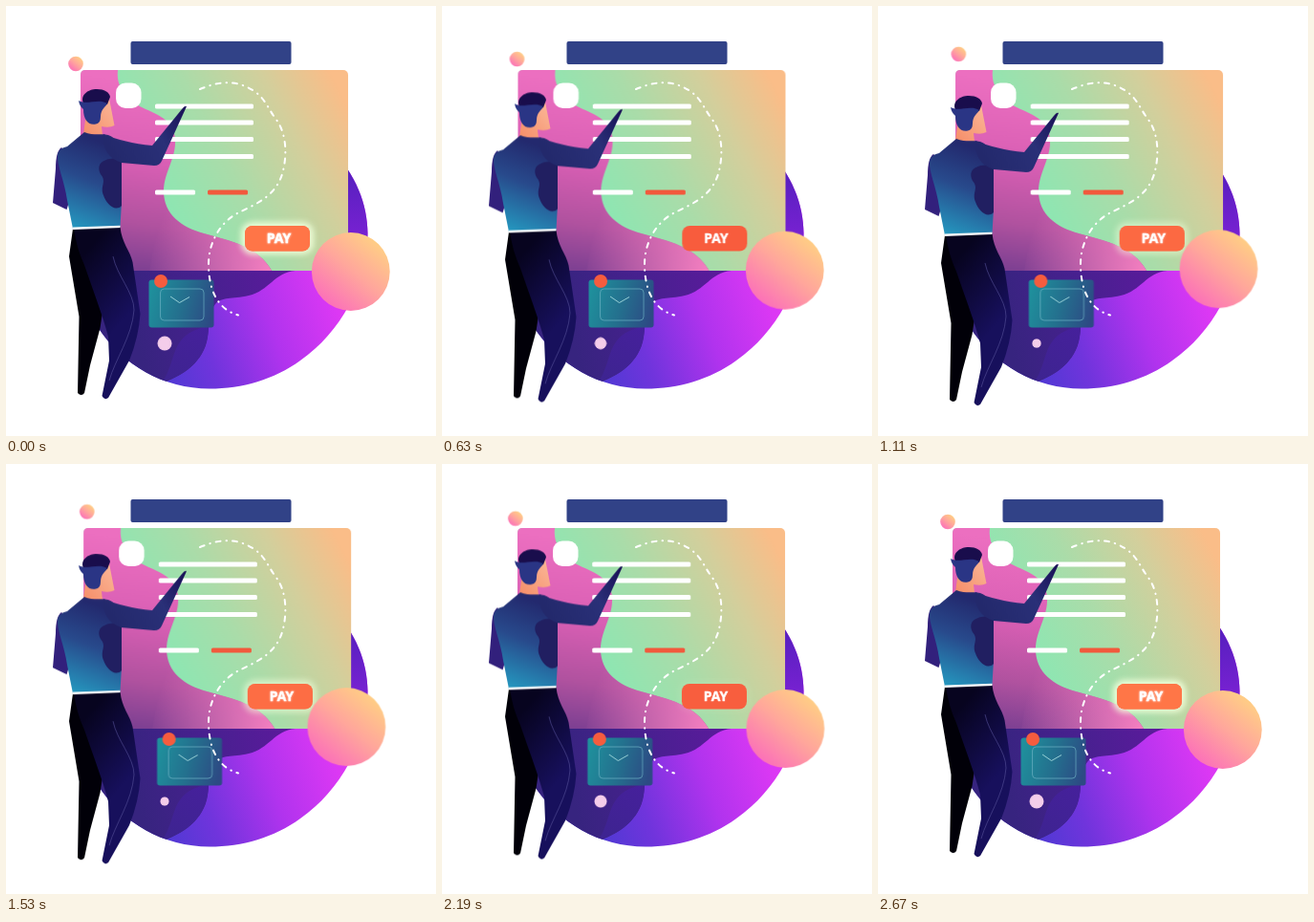
Write an HTML page that moves like this. It is 450 px wide and 450 px high and loops after 2700 ms.

```html
<!DOCTYPE html>
<html lang="en">
<head>
<meta charset="utf-8">
<title>Payment illustration</title>
<style>
  html, body { margin: 0; width: 100%; height: 100%; overflow: hidden; background: #fff; }
  svg { display: block; width: 100vw; height: 100vh; }
  #dot { transform-box: fill-box; transform-origin: center; }
  .pay { font: 700 14px "Open Sans", "Noto Sans", sans-serif; text-anchor: middle; fill: #fff; stroke: #fff; stroke-width: .4; }
  .soft { filter: blur(3px); }
  .halo { filter: blur(1px); }
</style>
</head>
<body>
<svg viewBox="0 0 450 450">
  <defs>
    <linearGradient id="blobFill" gradientUnits="userSpaceOnUse" x1="150" y1="370" x2="340" y2="300">
      <stop offset="0" stop-color="#4a3ad2"/>
      <stop offset=".3" stop-color="#7034dc"/>
      <stop offset=".65" stop-color="#b133ee"/>
      <stop offset="1" stop-color="#dc38f4"/>
    </linearGradient>
    <linearGradient id="blobTop" gradientUnits="userSpaceOnUse" x1="130" y1="320" x2="300" y2="280">
      <stop offset="0" stop-color="#37247f"/>
      <stop offset=".5" stop-color="#482090"/>
      <stop offset="1" stop-color="#5c1a9c"/>
    </linearGradient>
    <linearGradient id="blobSide" x1="0" y1="0" x2="0" y2="1">
      <stop offset="0" stop-color="#4a1fb8"/>
      <stop offset="1" stop-color="#8a22dc"/>
    </linearGradient>
    <linearGradient id="lobe" gradientUnits="userSpaceOnUse" x1="205" y1="330" x2="165" y2="392">
      <stop offset="0" stop-color="#46209c"/>
      <stop offset="1" stop-color="#3d2490"/>
    </linearGradient>
    <linearGradient id="cardFill" gradientUnits="userSpaceOnUse" x1="165" y1="200" x2="355" y2="100">
      <stop offset="0" stop-color="#8ee6b2"/>
      <stop offset=".35" stop-color="#aadca9"/>
      <stop offset=".7" stop-color="#d3cf9c"/>
      <stop offset="1" stop-color="#fabd88"/>
    </linearGradient>
    <linearGradient id="waveFill" gradientUnits="userSpaceOnUse" x1="170" y1="85" x2="140" y2="285">
      <stop offset="0" stop-color="#ec6fc0"/>
      <stop offset=".4" stop-color="#d95fb4"/>
      <stop offset=".72" stop-color="#b0529f"/>
      <stop offset="1" stop-color="#753d90"/>
    </linearGradient>
    <linearGradient id="waveEnd" gradientUnits="userSpaceOnUse" x1="160" y1="230" x2="278" y2="270">
      <stop offset="0" stop-color="#f47fc0" stop-opacity="0"/>
      <stop offset="1" stop-color="#f47fc0"/>
    </linearGradient>
    <linearGradient id="ball" x1=".85" y1=".1" x2=".2" y2=".9">
      <stop offset="0" stop-color="#ffd084"/>
      <stop offset=".5" stop-color="#ffa69c"/>
      <stop offset="1" stop-color="#fc72b8"/>
    </linearGradient>
    <linearGradient id="mailFill" x1="0" y1=".4" x2="1" y2=".6">
      <stop offset="0" stop-color="#1f8f9c"/>
      <stop offset=".5" stop-color="#24708e"/>
      <stop offset="1" stop-color="#2d4a84"/>
    </linearGradient>
    <linearGradient id="shirt" gradientUnits="userSpaceOnUse" x1="108" y1="145" x2="74" y2="232">
      <stop offset="0" stop-color="#23296e"/>
      <stop offset=".45" stop-color="#284a8c"/>
      <stop offset="1" stop-color="#2596be"/>
    </linearGradient>
    <linearGradient id="arm" gradientUnits="userSpaceOnUse" x1="110" y1="155" x2="188" y2="110">
      <stop offset="0" stop-color="#23296c"/>
      <stop offset=".6" stop-color="#2a3078"/>
      <stop offset="1" stop-color="#1a1258"/>
    </linearGradient>
    <linearGradient id="skin" x1="0" y1="1" x2="1" y2="0">
      <stop offset="0" stop-color="#f58d68"/>
      <stop offset="1" stop-color="#fbb99a"/>
    </linearGradient>
    <linearGradient id="leg" gradientUnits="userSpaceOnUse" x1="80" y1="260" x2="138" y2="310">
      <stop offset="0" stop-color="#07041f"/>
      <stop offset="1" stop-color="#17105c"/>
    </linearGradient>
    <clipPath id="blobClip"><use href="#blob"/></clipPath>
  </defs>

  <rect width="450" height="450" fill="#fff"/>

  <path id="blob" fill="url(#blobFill)" d="M340 150C366 175 378.500 208 378.500 238C378.500 290 350 342 308 371C280 391 248 400.500 213 400.500C165 400.500 122 376 96 336L97 200Z"/>
  <g clip-path="url(#blobClip)">
    <rect x="340" y="150" width="60" height="127" fill="url(#blobSide)"/>
    <path fill="url(#blobTop)" d="M90 277H303C280 279 276 298 254 303C236 307 226 304 219 312C212 320 213 333 211 347C207 372 186 387 160 396L90 390Z"/>
    <path fill="url(#lobe)" d="M212 334C212 368 190 386 164 393C178 372 172 352 196 340Z"/>
  </g>

  <g id="card">
    <rect x="78" y="67" width="280" height="210" rx="5" fill="url(#cardFill)"/>
    <path fill="url(#waveFill)" d="M83 67H117C115 83 124 96 140 105C156 113 176 118 177 140C178 160 165 174 165 194C165 218 184 232 207 238C236 246 264 252 278 277H83Q78 277 78 272V72Q78 67 83 67Z"/>
    <path fill="url(#waveEnd)" d="M165 194C165 218 184 232 207 238C236 246 264 252 278 277H150Z"/>
    <rect x="115" y="80.500" width="26.500" height="26.500" rx="10" fill="#fff"/>
  </g>

  <rect x="130.500" y="37" width="168" height="24" rx="2" fill="#314287"/>

  <g id="lines"></g>

  <g id="button">
    <rect class="glow soft" x="246" y="226" width="76" height="34" rx="12" fill="#f0ffda"/>
    <rect x="250" y="230" width="68" height="26.500" rx="8" fill="#f85c3e"/>
    <rect class="glow" x="250" y="230" width="68" height="26.500" rx="8" fill="#ff7848" opacity="0"/>
    <text class="pay glow halo" x="285.500" y="248">PAY</text>
    <text class="pay" x="285.500" y="248">PAY</text>
  </g>

  <g id="mail">
    <rect x="149.500" y="286.500" width="68" height="50" rx="3" fill="url(#mailFill)"/>
    <rect x="161.500" y="296" width="45.500" height="33" rx="4" fill="none" stroke="#6fb4c4" stroke-width=".7"/>
    <path d="M172 304L181.500 310.500L192 304.500" fill="none" stroke="#a6dde0" stroke-width=".9"/>
    <circle cx="162" cy="288" r="7" fill="#f65c3e"/>
  </g>

  <path fill="none" stroke="#fff" stroke-width="2" stroke-linecap="round" stroke-dasharray="5 6 .5 6"
    d="M203 87C220 80 240 75 261 90C272 98 275 109 283 119C293 133 295 155 289 176C281 201 259 208 242 217C222 228 212 250 212 270C212 295 220 317 243 323.500"/>

  <circle id="dot" cx="166" cy="353" r="7.500" fill="#f4cdea"/>
  <circle id="big" cx="360.800" cy="278" r="40.900" fill="url(#ball)"/>
  <circle id="small" cx="73" cy="60.500" r="7.800" fill="url(#ball)"/>

  <g id="man">
    <path fill="#010008" d="M70 233H118L104 300L98.500 337L88 376L82 405Q79 409 75 405L76.500 325L66 262Z"/>
    <path fill="url(#leg)" d="M71 233L119.500 231C121 248 130 256 132.500 268L140.500 322Q139 346 129 371L107 410Q103 413 100.500 408L108 371L107 346C102 326 92 300 82 271Q74 254 71 233Z"/>
    <path fill="none" stroke="#5a559c" stroke-width=".6" d="M112 262C116 282 134 300 134 318C132 346 114 370 108 392"/>

    <path fill="url(#skin)" d="M84 112L100 97L108 97L113.500 125Q108 128 100 126L101 135L81 134Z"/>
    <path fill="#190d4c" d="M81 102C77 93 86 87 95 87C103 87 108 90 109 95L106 103Z"/>
    <path fill="#2a3585" d="M76 99C84 104 97 96 106 102C104 106 99 108 99 116Q99 123 94 123.500C86 125 81 119 81 108Q77 105 76 99Z"/>

    <path fill="#32207c" d="M58 148L70 160L66 205L63.500 213L49 206L52 170Q52 152 58 148Z"/>
    <path fill="url(#shirt)" d="M82 132C92 136 101 133 107 135Q121 140 121 165L121 205L119.500 231L70 233L64 203C61 182 53 166 54 156Q55 149 64 147Z"/>
    <path fill="#211f61" d="M121 160V209C114 216 105 207 102 198C98 188 106 184 99 176C93 164 104 158 121 160Z"/>
    <path fill="url(#arm)" d="M102 134C117 140 133 144 153 146L184 108Q187 104 189 105L163 162Q161 167 155 167L121 164Q100 157 102 134Z"/>
    <path fill="#fff" d="M70 231.500L119.500 229.700V232L70 234Z"/>
  </g>
</svg>
<script>
  const HALF = 1350;
  const $ = id => document.getElementById(id);

  // x, y, width, colour
  const bars = [
    [156, 105, 103, "#fff"], [156, 122, 103, "#fff"], [156, 139.5, 103, "#fff"], [156, 157.5, 103, "#fff"],
    [156, 195, 42, "#fff"], [211, 195, 42, "#f2593c"]
  ];
  for (const [x, y, width, fill] of bars) {
    const bar = document.createElementNS("http://www.w3.org/2000/svg", "rect");
    const attrs = { x, y: y - 2.5, width, height: 5, rx: 1.5, fill };
    for (const key in attrs) bar.setAttribute(key, attrs[key]);
    $("lines").append(bar);
  }

  // Furthest pose of each part, reached halfway through the loop
  const poses = {
    card: "translate(3.3px, 0px)",
    lines: "translate(4px, 0px)",
    button: "translate(3px, 0px)",
    mail: "translate(9px, 0px)",
    big: "translate(-4.7px, -3px)",
    small: "translate(12.3px, -11px)",
    man: "translate(0px, 7.5px)",
    dot: "scale(.6)"
  };
  const sway = { duration: HALF, iterations: Infinity, direction: "alternate", easing: "cubic-bezier(.364, 0, .636, 1)" };
  const moves = Object.keys(poses).map(id => {
    const rest = id === "dot" ? "scale(1)" : "translate(0px, 0px)";
    return $(id).animate([{ transform: rest }, { transform: poses[id] }], sway);
  });

  const pulse = [[0, 1], [.18, .5], [.34, .12], [.5, 0], [.66, .12], [.82, .5], [1, 1]]
    .map(([offset, opacity]) => ({ offset, opacity }));
  for (const el of document.querySelectorAll(".glow"))
    moves.push(el.animate(pulse, { duration: HALF, iterations: Infinity }));

  const start = document.timeline.currentTime;
  for (const move of moves) move.startTime = start;
</script>
</body>
</html>
```
